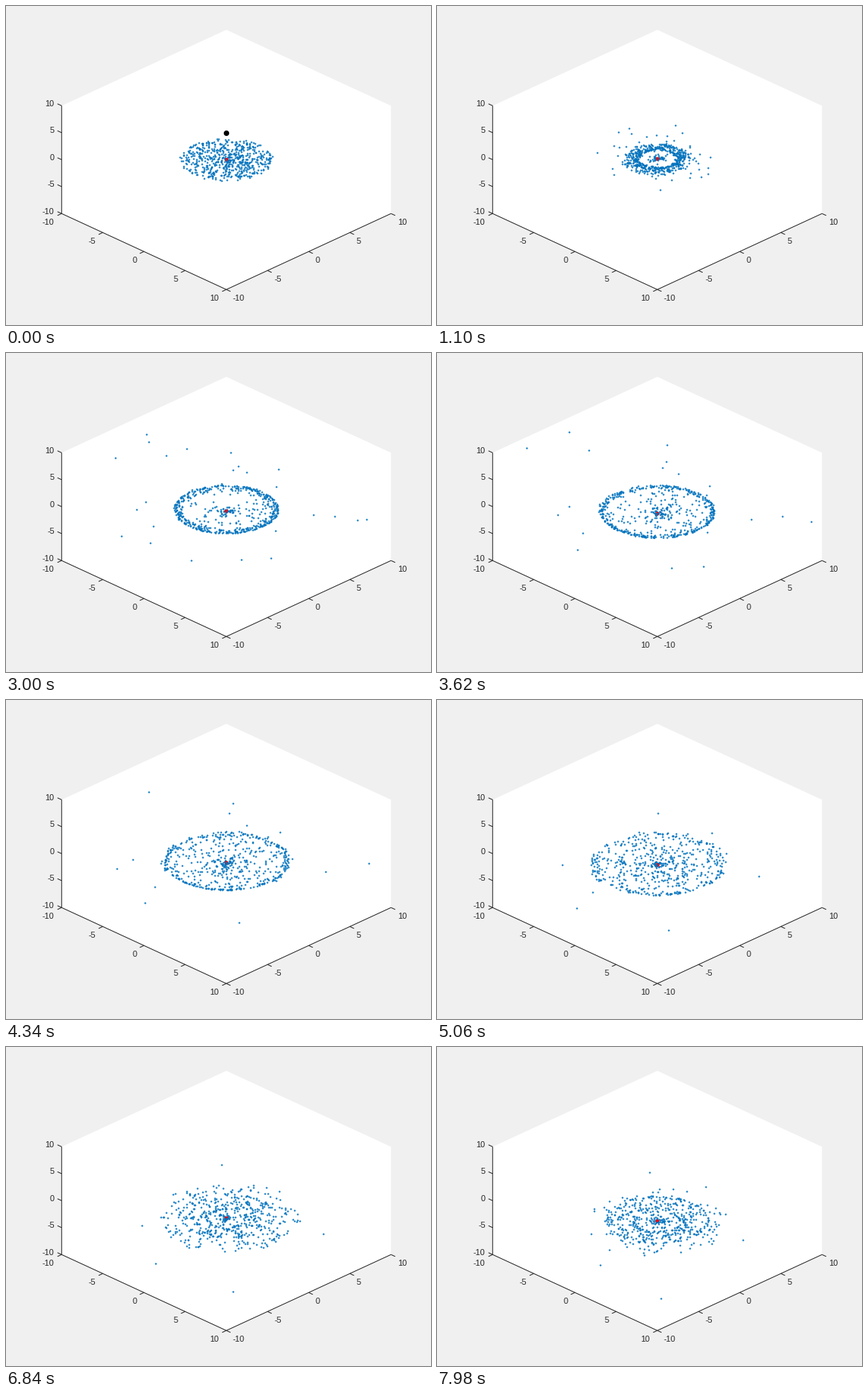
A matplotlib script for the animation above (8000 ms loop, 560 px wide and 420 px high).

```python
import numpy as np
import matplotlib.pyplot as plt
from matplotlib.animation import FuncAnimation

W, H, DPI = 560, 420, 100
PX = 72 / DPI
FRAMES, STEP_MS = 400, 20
INK = "#262626"
BLUE = "#0072BD"
CX, CY = 290.3, 202.3
LIM = 10

# Physics, in axis units and seconds
M_CORE, M_HOLE = 38.0, 51.0
N_STARS = 600
R_DISK = 4.0
SOFT_CORE, SOFT_HOLE, SOFT_PAIR = 0.12, 0.5, 0.8
SUBSTEPS = 10


def project(p):
    x, y, z = np.asarray(p, float).T
    return CX + 10.85 * (x + y), CY + 5.0 * (x - y) - 7.1 * z


def depth(p):
    x, y, z = p.T
    return 0.628 * (x - y) + 0.46 * z


def inside(p):
    return np.all(np.abs(p) <= LIM, axis=-1)


def pull(mass, offset, soft):
    d2 = (offset ** 2).sum(axis=-1, keepdims=True) + soft ** 2
    return mass * offset / d2 ** 1.5


def scatter(rng, offset):
    """Velocities near escape speed, in random, mostly flat directions."""
    way = rng.normal(size=offset.shape) * [1, 1, 0.35]
    way /= np.linalg.norm(way, axis=1, keepdims=True)
    dist = np.linalg.norm(offset, axis=1, keepdims=True)
    factor = rng.uniform(0.87, 1.05, dist.shape)
    return factor * np.sqrt(2 * M_CORE / dist) * way + [0, 0, 1.0]


def simulate():
    """Disk of massless stars around a core, hit head-on by an intruder."""
    rng = np.random.default_rng(7)
    r = R_DISK * rng.random(N_STARS) ** 0.66
    a = rng.uniform(0, 2 * np.pi, N_STARS)
    speed = np.sqrt(M_CORE) * r / (r ** 2 + SOFT_CORE ** 2) ** 0.75
    speed *= rng.normal(0.95, 0.03, N_STARS)
    debris = (r > 0.5) & (r < 1.4) & (rng.random(N_STARS) < 0.5)
    drift = np.array([0, 0, -0.06])

    zero = np.zeros(N_STARS)
    stars = np.column_stack([r * np.cos(a), r * np.sin(a), zero])
    v_stars = np.column_stack([-speed * np.sin(a), speed * np.cos(a), zero]) + drift
    core, v_core = np.zeros(3), drift.copy()
    hole, v_hole = np.array([0, 0, 5.0]), np.array([0, 0, -18.0])

    dt = STEP_MS / 1000 / SUBSTEPS
    passed = False
    track = []
    for _ in range(FRAMES):
        track.append((stars, core, hole))
        for _ in range(SUBSTEPS):
            stars = stars + v_stars * dt / 2
            core = core + v_core * dt / 2
            hole = hole + v_hole * dt / 2
            v_stars = v_stars + dt * (pull(M_CORE, core - stars, SOFT_CORE)
                                      + pull(M_HOLE, hole - stars, SOFT_HOLE))
            v_core = v_core + dt * pull(M_HOLE, hole - core, SOFT_PAIR)
            v_hole = v_hole + dt * pull(M_CORE, core - hole, SOFT_PAIR)
            stars = stars + v_stars * dt / 2
            core = core + v_core * dt / 2
            hole = hole + v_hole * dt / 2
            if not passed and hole[2] < core[2] - 1.5:
                passed = True
                v_stars[debris] = scatter(rng, stars[debris] - core)
    return track


track = simulate()

fig = plt.figure(figsize=(W / DPI, H / DPI), dpi=DPI, facecolor="#F0F0F0")
ax = fig.add_axes([0, 0, 1, 1])
ax.set_xlim(0, W)
ax.set_ylim(H, 0)
ax.axis("off")


def stroke(x, y):
    ax.plot(x, y, color=INK, lw=PX, solid_capstyle="butt", zorder=2)


def tick(point, dx, dy):
    (x,), (y,) = project([point])
    stroke([x, x + dx], [y, y + dy])
    return x, y


def label(x, y, value, ha):
    ax.text(x, y, str(value), ha=ha, va="center", color=INK,
            family="Liberation Sans", fontsize=11 * PX)


def draw_box():
    hull = [(-10, -10, 10), (-10, 10, 10), (10, 10, 10),
            (10, 10, -10), (10, -10, -10), (-10, -10, -10)]
    ax.fill(*project(hull), color="white", lw=0, zorder=1)
    stroke(*project([hull[0], hull[5], hull[4], hull[3]]))
    for v in range(-LIM, LIM + 1, 5):
        x, y = tick((v, -10, -10), -5.5, 2.5)
        label(x - 9.5, y + 11.8, v, "right")
        x, y = tick((10, v, -10), 5.5, 2.5)
        label(x + 8.7, y + 11.8, v, "left")
        x, y = tick((-10, -10, v), -5.5, -2.5)
        label(x - 9.5, y - 2.6, v, "right")


def dots(color, size, z):
    return ax.plot([], [], "o", color=color, ms=size * PX, mew=0, zorder=z)[0]


draw_box()
back = dots(BLUE, 2.3, 3)
nucleus = dots("red", 5, 4)
front = dots(BLUE, 2.3, 5)
intruder = dots("black", 7.2, 6)


def draw(i):
    stars, core, hole = track[i]
    seen = stars[inside(stars)]
    near = depth(seen) > depth(core)
    back.set_data(*project(seen[~near]))
    front.set_data(*project(seen[near]))
    nucleus.set_data(*project(core[None]))
    intruder.set_data(*project(hole[None]))
    intruder.set_visible(bool(inside(hole)))
    intruder.set_zorder(6 if hole[2] > core[2] else 2.5)
    return back, nucleus, front, intruder


anim = FuncAnimation(fig, draw, frames=FRAMES, interval=STEP_MS,
                     repeat=True, repeat_delay=0)
plt.show()
```
